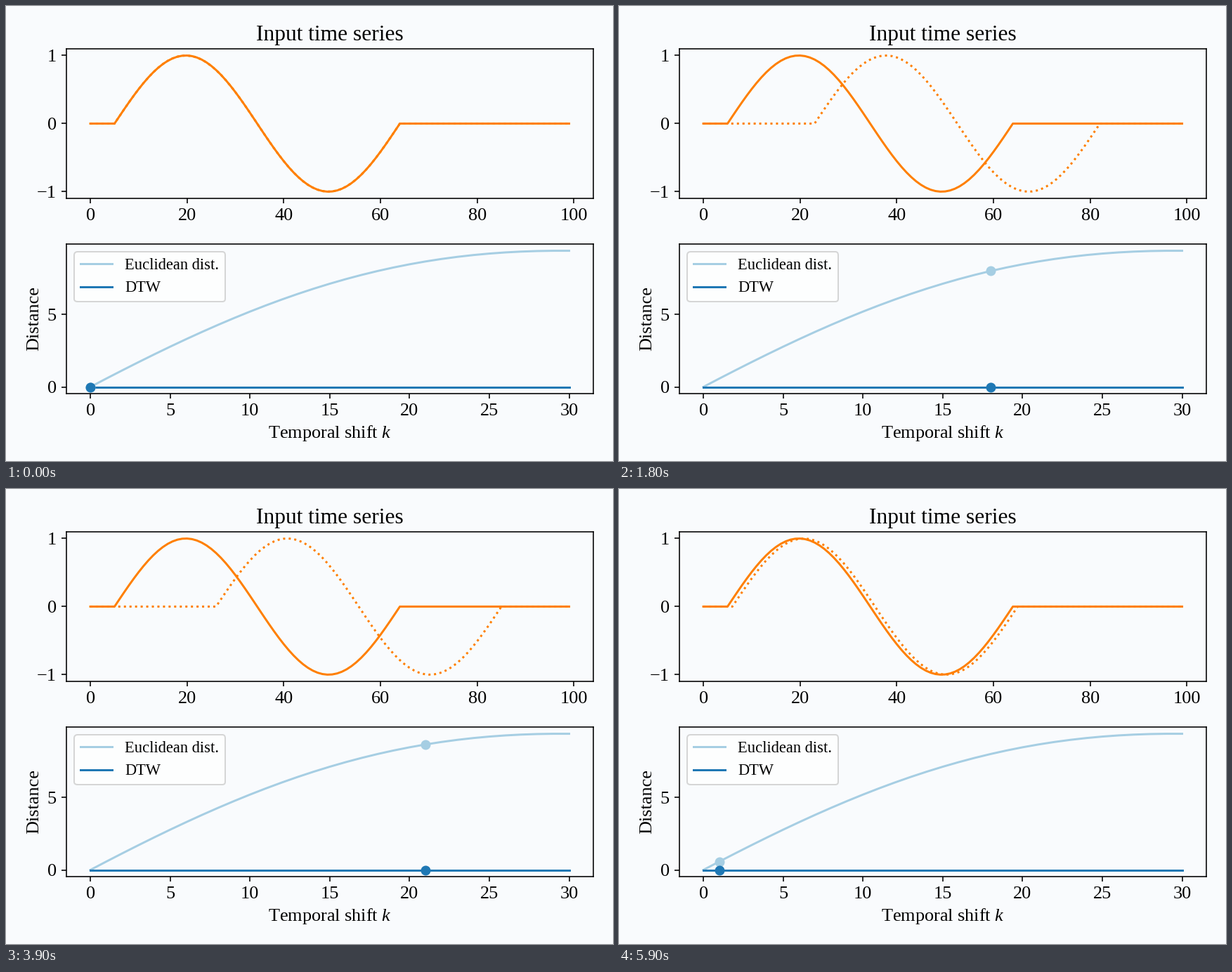
A matplotlib script that plays this animation: 864x648 px, repeating every 6000 ms.

```python
import numpy as np
import matplotlib.pyplot as plt
from matplotlib.animation import FuncAnimation

W, H, DPI = 864, 648, 144
MAX_SHIFT = 30
BACK = "#f9fbfd"
ORANGE, LIGHT, DARK = "#ff7f00", "#a6cee3", "#1f78b4"

plt.rcParams.update({
    "font.family": "Liberation Serif",
    "font.size": 13.15,
    "mathtext.fontset": "custom",
    "mathtext.rm": "Liberation Serif",
    "mathtext.it": "Liberation Serif:italic",
})


def series(shift):
    """One sine period of 60 samples inside 100 zeros."""
    y = np.zeros(100)
    y[5 + shift:65 + shift] = np.sin(np.linspace(0, 2 * np.pi, 60))
    return y


def add_axes(left, top, right, bottom):
    """Axes given by pixel edges, measured from the top left."""
    return fig.add_axes([left / W, 1 - bottom / H,
                         (right - left) / W, (bottom - top) / H],
                        facecolor="none")


fig = plt.figure(figsize=(W / DPI, H / DPI), dpi=DPI, facecolor=BACK)
signal_ax = add_axes(86, 60.8, 835.6, 274.1)
dist_ax = add_axes(86, 338.9, 835.6, 552.2)

base = series(0)
shifts = np.arange(MAX_SHIFT + 1)
euclid = np.array([np.linalg.norm(series(k) - base) for k in shifts])

# Upper panel
signal_ax.plot(base, color=ORANGE)
moving, = signal_ax.plot(base, color=ORANGE, linestyle=":")
signal_ax.set_title("Input time series", fontsize=15.75)
signal_ax.set_xticks(range(0, 101, 20))
signal_ax.set_yticks([-1, 0, 1])
signal_ax.set_xlim(-4.95, 103.95)
signal_ax.set_ylim(-1.1, 1.1)

# Lower panel
dist_ax.plot(shifts, euclid, color=LIGHT, label="Euclidean dist.")
dist_ax.plot(shifts, 0 * euclid, color=DARK, label="DTW")
euclid_dot, = dist_ax.plot([0], [0], "o", color=LIGHT)
dtw_dot, = dist_ax.plot([0], [0], "o", color=DARK)
dist_ax.set_xticks(range(0, 31, 5))
dist_ax.set_yticks([0, 5])
dist_ax.set_xlim(-1.5, 31.5)
dist_ax.set_ylim(-0.05 * euclid.max(), 1.05 * euclid.max())
dist_ax.legend(loc="upper left", fontsize=11.25, facecolor="white")

fig.text(461 / W, 1 - 614.5 / H, "Temporal shift $k$",
         ha="center", va="baseline")
fig.text(46.5 / W, 1 - 445.5 / H, "Distance", rotation=90,
         rotation_mode="anchor", ha="center", va="baseline")


def update(frame):
    k = MAX_SHIFT - abs(MAX_SHIFT - frame)
    moving.set_ydata(series(k))
    euclid_dot.set_data([k], [euclid[k]])
    dtw_dot.set_data([k], [0])
    return moving, euclid_dot, dtw_dot


anim = FuncAnimation(fig, update, frames=2 * MAX_SHIFT, interval=100,
                     repeat=True, repeat_delay=0)
plt.show()
```
